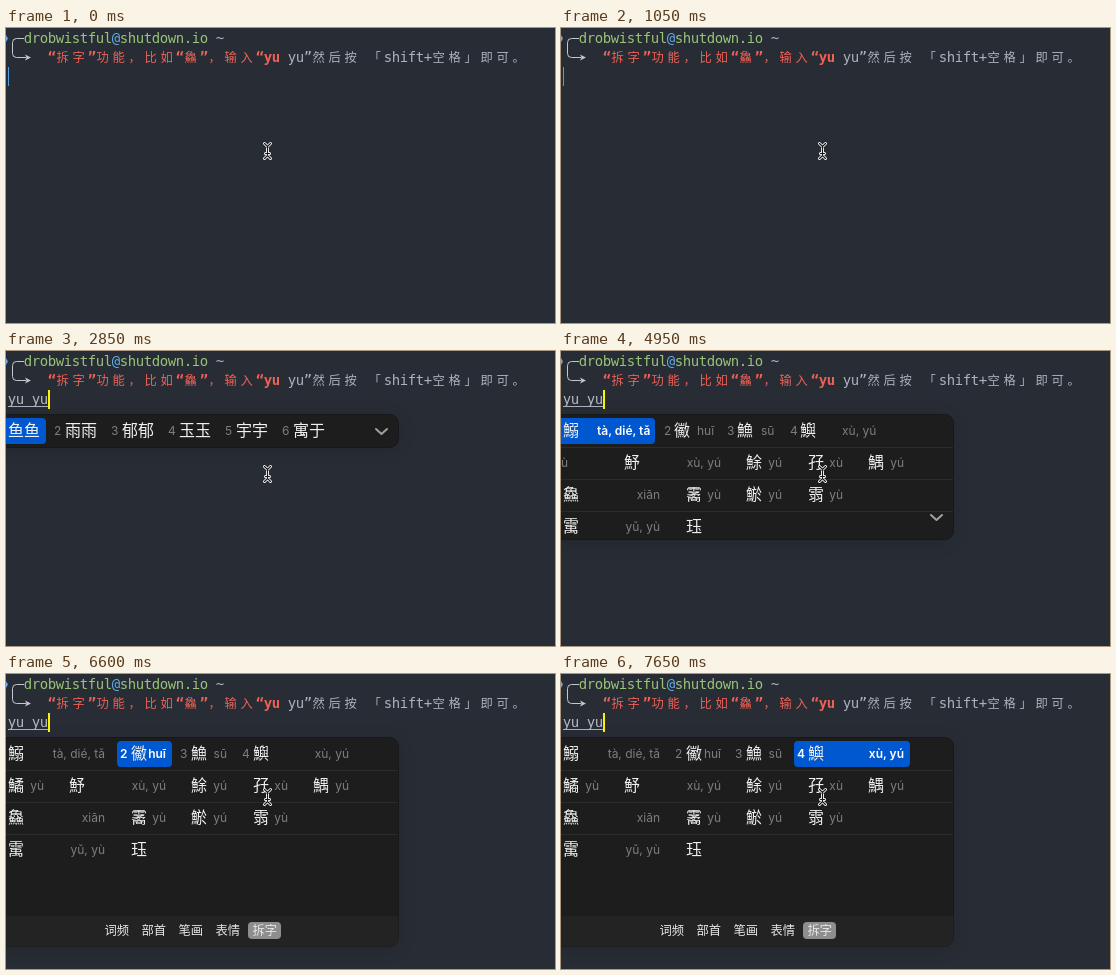
An HTML page that plays this animation: 549 by 295 pixels, repeating every 8000 ms.

```html
<!DOCTYPE html>
<html lang="zh-CN">
<head>
<meta charset="utf-8">
<title>拆字输入</title>
<style>
html, body { margin: 0; width: 100%; height: 100%; overflow: hidden; background: #282c34; }
svg { display: block; width: 100vw; height: 100vh; }
text { white-space: pre; }
.term { font: 14px "DejaVu Sans Mono", monospace; }
.wide { font: 12.3px "Noto Sans CJK SC", "Noto Sans CJK", sans-serif; }
.term.bold { font-weight: 700; }
.wide.bold { font-weight: 500; }
.han { font: 500 16px "Noto Sans CJK SC", "Noto Sans CJK", sans-serif; fill: #f0f0f0; }
.tab { font: 500 12.3px "Noto Sans CJK SC", "Noto Sans CJK", sans-serif; fill: #e8e8e8; }
.note { font: 12px Inter, "Noto Sans", sans-serif; fill: #7e7e7e; }
.hot { fill: #fff; font-weight: 600; }
.panel { fill: #1d1d1e; stroke: #17181b; filter: drop-shadow(0 3px 8px rgba(0,0,0,.1)); }
.pick { fill: #0058d0; }
.rule { stroke: #2c2c2c; }
.chevron { fill: none; stroke: #a0a0a0; stroke-width: 2; stroke-linecap: round; stroke-linejoin: round; }
</style>
</head>
<body>
<svg id="stage" viewBox="0 0 549 295" preserveAspectRatio="none">
  <rect width="549" height="295" fill="#282c34"/>
</svg>
<script>
const LOOP = 8000, CELL = 8, LEFT = 2;
const stage = document.getElementById('stage');
const timed = [];

function add(parent, tag, attrs, content) {
  const el = document.createElementNS('http://www.w3.org/2000/svg', tag);
  for (const key in attrs) el.setAttribute(key, attrs[key]);
  if (content !== undefined) el.textContent = content;
  return parent.appendChild(el);
}

// A group that is visible from start (inclusive) to end, in ms.
function during(start, end, parent = stage) {
  const el = add(parent, 'g', {});
  timed.push({ el, start, end });
  return el;
}

const WIDE = /[\u3000-\u9fff\uff00-\uffef]/;

// Terminal text on a fixed grid; returns the column after the last character.
function term(parent, col, y, str, fill, bold = false) {
  for (const run of str.match(/[\u3000-\u9fff\uff00-\uffef]+|[^\u3000-\u9fff\uff00-\uffef]+/g)) {
    const wide = WIDE.test(run), span = wide ? 2 : 1, inset = wide ? .6 : -.2;
    const xs = [...run].map((_, i) => LEFT + inset + (col + i * span) * CELL);
    const kind = (wide ? 'wide' : 'term') + (bold ? ' bold' : '');
    add(parent, 'text', { class: kind, x: xs.join(' '), y, fill }, run);
    col += run.length * span;
  }
  return col;
}

const han = (g, x, y, str) => add(g, 'text', { class: 'han', x, y }, str);
const note = (g, x, y, str, hot, anchor = 'start') =>
  add(g, 'text', { class: 'note' + (hot ? ' hot' : ''), x, y, 'text-anchor': anchor }, str);
const pick = (g, x, w) => add(g, 'rect', { class: 'pick', x, y: 67, width: w, height: 26, rx: 4 });
const chevron = (g, x, y) => add(g, 'path', { class: 'chevron', d: `M${x} ${y}l5.5 5 5.5-5` });
const rule = (g, y) => add(g, 'path', { class: 'rule', d: `M0 ${y}.5H392` });
const panel = (g, right, bottom) =>
  add(g, 'rect', { class: 'panel', x: -20, y: 63.5, width: right + 19.5, height: bottom - 64, rx: 9 });

// Shell prompt and the instruction line
add(stage, 'path', { d: 'M0 7L2 10.5 0 14z', fill: '#61afef' });
add(stage, 'path', { d: 'M18 10.5H10.5Q6.5 10.5 6.5 14.5V25.5Q6.5 29.5 10.5 29.5H20', fill: 'none', stroke: '#c3c8d0' });
add(stage, 'path', { d: 'M19 26.5L25 29.5 19 32.5 20.5 29.5z', fill: '#c3c8d0' });
let col = term(stage, 2, 15, 'drobwistful', '#98c379');
col = term(stage, col, 15, '@', '#61afef');
col = term(stage, col, 15, 'shutdown.io', '#98c379');
term(stage, col + 1, 15, '~', '#abb2bf');
col = term(stage, 5, 34, '“拆字”功能，比如“鱻”，输入“yu', '#ef6155', true);
term(stage, col, 34, ' yu”然后按 「shift+空格」即可。', '#abb2bf');

// Idle caret, then the text being composed
for (const [start, end] of [[0, 300], [1050, 1350]])
  add(during(start, end), 'rect', { x: 2, y: 39, width: 1, height: 19, fill: '#4f9fe6' });

for (const [start, end, str] of [
  [450, 1050, 'yu'], [1800, 1950, 'y'], [1950, 2400, 'yu'], [2400, 2850, 'yu y'], [2850, LOOP, 'yu yu']
]) {
  const g = during(start, end), width = str.length * CELL;
  term(g, 0, 53, str, '#b4bac5');
  add(g, 'path', { d: `M2 55.5h${width}`, stroke: '#abb2bf' });
  add(g, 'rect', { x: LEFT + width, y: 39, width: 2, height: 19, fill: '#fff200' });
}

function rainCloud(g, x) {
  add(g, 'path', {
    d: `M${x + 4} 81a4 4 0 0 1 0-7 5 5 0 0 1 8-3 4 4 0 0 1 5 3 3.6 3.6 0 0 1 0 7z`, fill: '#eef2f5'
  });
  add(g, 'path', {
    d: `M${x + 5} 82l-2 4m6-4l-2 4m6-4l-2 4m6-4l-2 4`, stroke: '#4ba6e8', 'stroke-width': 1.5, fill: 'none'
  });
}

function fish(g, x) {
  add(g, 'path', { d: `M${x + 14} 79l6-5q-1 5 1 10z M${x + 6} 75l5-4 4 5z M${x + 8} 83l4 4 1-5z`, fill: '#3b8fc4' });
  add(g, 'ellipse', { cx: x + 8.5, cy: 79, rx: 8, ry: 5.4, fill: '#56b0dc' });
  add(g, 'path', { d: `M${x + 2} 81q6 4 12 0-6 6-12 0z`, fill: '#c5e5f0' });
  add(g, 'circle', { cx: x + 4.5, cy: 77.5, r: 1.1, fill: '#15232c' });
}

// One row of numbered candidates, each at its own x
function candidates(g, items, xs) {
  items.forEach((item, i) => {
    if (i) note(g, xs[i] - 11, 84, i + 1);
    if (typeof item === 'function') item(g, xs[i] + 1);
    else han(g, xs[i], 85, item);
  });
}

const words = ['与', '于', '雨', rainCloud, '鱼', fish, '余', '语'];
const wordXs = [2, 44, 83, 123, 171, 211, 258, 298];
const pairXs = [2, 59, 116, 173, 230, 287];

const small = during(600, 1050);
panel(small, 218, 124);
pick(small, -6, 30);
candidates(small, words.slice(0, 5), wordXs);

const bar = during(1950, 4950);
panel(bar, 393, 97);
chevron(bar, 370, 78);

const single = during(1950, 2400);
pick(single, -6, 30);
candidates(single, words, wordXs);

for (const [start, end, pairs] of [
  [2400, 2850, '语言 寓意 育婴 语音 渔业 预约'],
  [2850, 4950, '鱼鱼 雨雨 郁郁 玉玉 宇宇 寓于']
]) {
  const g = during(start, end);
  pick(g, -6, 46);
  candidates(g, pairs.split(' '), pairXs);
}

// Expanded grid
const opening = during(4950, 5100);
panel(opening, 393, 189);
const full = during(5100, LOOP);
panel(full, 393, 273);
add(full, 'path', { d: 'M0 242H392.5V264a8.5 8.5 0 0 1-8.5 8.5H0z', fill: '#232323' });

const grid = during(4950, LOOP);
[96, 128, 160].forEach(y => rule(grid, y));

const cells = [
  [63, 117, '魣', 160, 'xù, yú'], [185, 117, '鮽', 221, 'yú'], [247, 117, '孖', 282, 'xù'], [307, 117, '鰅', 343, 'yú'],
  [2, 149, '鱻', 99, 'xiān'], [125, 149, '霱', 160, 'yù'], [185, 149, '鯲', 221, 'yú'], [247, 149, '䨒', 282, 'yù'],
  [2, 181, '䨞', 99, 'yǔ, yù'], [125, 181, '珏', 0, '']
];
function cell(g, [x, y, word, right, sound], hot) {
  han(g, x, y, word);
  note(g, right, y - 1, sound, hot, 'end');
}
cells.forEach(c => cell(grid, c));
cell(full, [2, 117, '鱊', 38, 'yù']);

// Short-lived layout of the first row while the panel opens
pick(opening, -6, 100);
note(opening, 0, 116, 'ù');
chevron(opening, 370, 164);
[['鰯', 2, 'tà, dié, tǎ', 36], ['鰴', 113, 'huī', 136], ['䲆', 176, 'sū', 200], ['鱮', 239, 'xù, yú', 281]]
  .forEach(([word, x, sound, sx], i) => {
    if (i) note(opening, x - 10, 84, i + 1);
    han(opening, x, 85, word);
    note(opening, sx, 84, sound, !i);
  });

// Settled first row, with the selection stepping right
const firstRow = [
  [2, 85, '鰯', 99, 'tà, dié, tǎ'], [125, 85, '鰴', 160, 'huī'],
  [185, 85, '䲆', 221, 'sū'], [247, 85, '鱮', 343, 'xù, yú']
];
const steps = [[5100, 6600, -6, 111], [6600, 7050, 111, 55], [7050, 7650, 172, 55], [7650, LOOP, 233, 116]];
steps.forEach(([start, end, x, width], active) => {
  const g = during(start, end);
  pick(g, x, width);
  firstRow.forEach((c, i) => {
    const hot = i === active;
    if (i) note(g, c[0] - 11, 84, i + 1, hot);
    cell(g, c, hot);
  });
});

add(full, 'rect', { x: 242, y: 248, width: 33, height: 17, rx: 4, fill: '#8e8e8e' });
['词频', '部首', '笔画', '表情', '拆字'].forEach((label, i) =>
  add(full, 'text', { class: 'tab', x: 98.5 + i * 37, y: 261 }, label));

// Mouse pointer
const beam = 'M258.5 115.5L261.5 118.5 264.5 115.5M261.5 118.5V127.5M258.5 130.5L261.5 127.5 264.5 130.5M259.5 125.5H263.5';
for (const [stroke, width] of [['#f4f4f4', 3], ['#15161a', 1.1]])
  add(stage, 'path', { d: beam, fill: 'none', stroke, 'stroke-width': width, 'stroke-linecap': 'round' });

function draw() {
  const t = performance.now() % LOOP;
  for (const { el, start, end } of timed)
    el.style.display = t >= start && t < end ? '' : 'none';
  requestAnimationFrame(draw);
}
draw();
</script>
</body>
</html>
```
